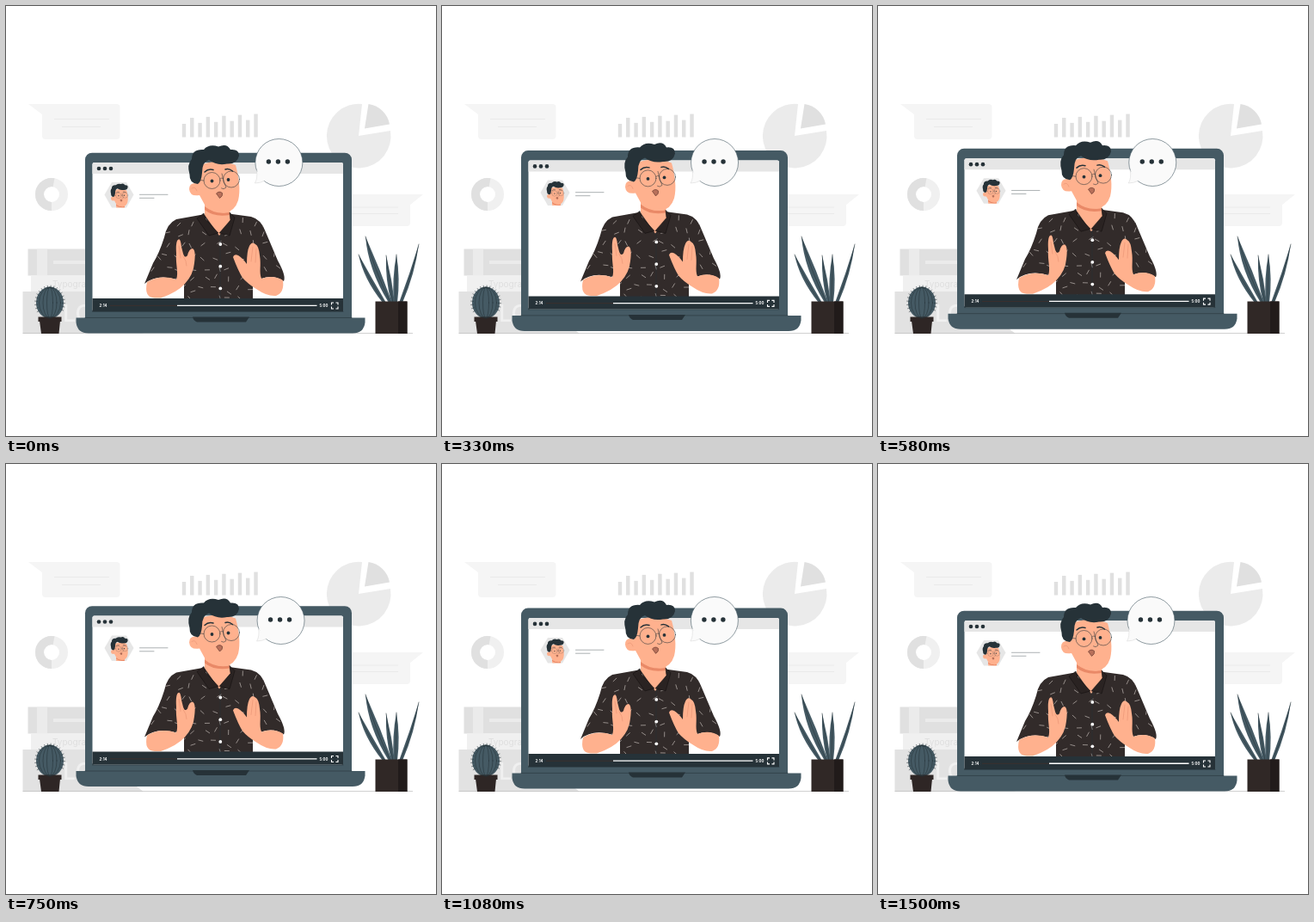
An HTML page that plays this animation: 500 px wide and 500 px high, repeating every 1540 ms.

```html
<!DOCTYPE html>
<html lang="en">
<head>
<meta charset="utf-8">
<title>Video call</title>
<style>
html, body { margin: 0; width: 100%; height: 100%; overflow: hidden; background: #fff; }
svg { display: block; width: 100vw; height: 100vh; }
text { font-family: Inter, sans-serif; }
.skin { fill: #ffb18e; }
.dark { fill: #263238; }
.steel { fill: #455a64; }
.pale { fill: #f5f5f5; }
.grey { fill: #e0e0e0; }
.mist { fill: #ebebeb; }
.line { fill: none; stroke: #263238; stroke-width: .55; stroke-linecap: round; }
.fold { fill: none; stroke: #e08a6c; stroke-width: .5; stroke-linecap: round; }
.ring { fill: none; stroke-width: 10; }
</style>
</head>
<body>
<svg viewBox="0 0 500 500">
  <defs>
    <path id="shirt" d="M226 243L198 248Q187 253 184 269Q178 288 171 299L161 323Q175 311 199 318L207 308V341H287V308L297 317Q311 312 323 320Q326 314 316 296L302 263Q297 248 285 245L263 242Z"/>
    <clipPath id="cloth"><use href="#shirt"/></clipPath>
    <path id="hexagon" d="M123 205H140L148.500 219.500L140 234.500H123L114.500 219.500Z"/>
    <clipPath id="frame"><use href="#hexagon"/></clipPath>
  </defs>

  <g id="wall">
    <path class="pale" d="M26 114H128.500Q132.500 114 132.500 118V151Q132.500 155 128.500 155H46Q42 155 42 151V126Z"/>
    <path class="pale" d="M485 219H395V256H466Q470 256 470 252V231Z"/>
    <path stroke="#e8e8e8" stroke-width=".8" d="M56 131.500H120M65 140.500H110M395 234H456M395 241.500H456"/>
    <g id="bars" class="grey"></g>
    <path class="mist" d="M410 151L414 114A37.300 37.300 0 1 0 447 145Z"/>
    <path class="grey" d="M417 142.500L421.500 114A29 29 0 0 1 446 137.500Z"/>
    <circle class="ring" cx="53" cy="219" r="14" stroke="#f0f0f0"/>
    <circle class="ring" cx="53" cy="219" r="14" stroke="#e0e0e0" pathLength="100" stroke-dasharray="53 47" transform="rotate(90 53 219)"/>
  </g>

  <g id="books">
    <path class="grey" d="M25.500 282.500H130V313.500H25.500Z"/>
    <path class="mist" d="M36 282.500H48V313.500H36ZM55 296H130V300H55Z"/>
    <path fill="#f0f0f0" d="M29 313.500H135V332H29Z"/>
    <text x="54" y="327" font-size="10" fill="#dedede">Typography</text>
    <path fill="#e2e2e2" d="M19.500 332H152V375L160 381H19.500Z"/>
    <text x="66" y="367" font-size="27" font-weight="500" fill="#f0f0f0">LOGO</text>
    <path stroke="#bdbdbd" stroke-width=".7" d="M19.500 380.500H473"/>
  </g>

  <g id="cactus">
    <ellipse class="steel" cx="51" cy="345" rx="16" ry="18.500"/>
    <path fill="#2e2625" d="M39 366H63L61.500 381H41ZM37.500 361.500H64.500V367H37.500Z"/>
  </g>

  <g id="plant"></g>
  <path fill="#302826" d="M429.500 343.500H466.500V381H429.500Z"/>
  <path fill="#211b1a" d="M456 343.500H466.500V381H456Z"/>

  <g id="laptop">
    <rect class="steel" x="92" y="170.700" width="310" height="200" rx="8"/>
    <rect x="100.500" y="182" width="291.500" height="173" rx="2" fill="#fff"/>
    <path fill="#e6e6e6" d="M100.500 195V184.500Q100.500 182 103 182H389.500Q392 182 392 184.500V195Z"/>
    <g id="window" class="dark"></g>

    <use href="#hexagon" fill="#e6e6e6"/>
    <g clip-path="url(#frame)"><use href="#head" transform="translate(49.500 151.500) scale(.34)"/></g>
    <path class="line" opacity=".7" d="M155.500 219.300H188M155.500 223.300H172"/>

    <use href="#shirt" fill="#322b2a"/>
    <g id="dashes" clip-path="url(#cloth)" stroke="#d8d0cc" stroke-width=".6" stroke-linecap="round"></g>
    <path class="line" d="M249 266V340"/>
    <g id="buttons" fill="#fff"></g>

    <g id="head">
      <path class="skin" d="M231 226L231 243L248 267L261 249L260 232Z"/>
      <path fill="#e98967" d="M231 233Q243 243 260 240L260 243Q242 246 231 237Z"/>
      <path class="skin" d="M226 185Q246 177 267 185C271 200 273 214 270 226Q266 239 254 240.500Q239 240 231 231L225 220Q214 222 213 213Q213 205 222 206Z"/>
      <path class="fold" d="M216 212Q220 209 222 215"/>
      <path class="dark" d="M223 207Q213 206 213.500 196Q210 184 216 178Q216 166 230 167Q236 160 247 163.500Q257 159 261 167Q271 166 271 174Q269 184 257 183.500Q245 186 236 179Q228 181 228 194Q227 205 223 207Z"/>
      <path class="line" style="stroke-width:1.500" d="M231 193Q235 189 241 190.500M255 190Q259 188.500 263.500 192"/>
      <path class="line" d="M249 201Q251 199 252.500 200.500M230 203L222 202M251 195Q253 205 256 211Q253 214 250.500 212"/>
      <circle class="line" cx="239.500" cy="203" r="9.500"/>
      <circle class="line" cx="262" cy="201.500" r="9.500"/>
      <circle class="dark" cx="239.500" cy="203.500" r="1.900"/>
      <circle class="dark" cx="258.500" cy="202" r="1.900"/>
      <path fill="#b8705a" stroke="#5a3229" stroke-width=".6" d="M244.500 218Q248 214.500 251.500 217.500Q252.500 221 248.500 223.500Z"/>
    </g>
    <path fill="#2a2322" stroke="#100d0d" stroke-width=".5" d="M230 241L222 247L236 267L247 264L232 248ZM260 240L266 246L260 267L248 264L261 249Z"/>

    <path class="skin" d="M164 321Q180 312 198 318C201 310 197 301 198 288Q197 273 200.500 271.500Q203 270 204 280L206 288Q208 294 211 290Q213 282 217 282Q221 284 219 299Q218 312 208 323Q199 333 180 339.500H173Q160 339 164 321Z"/>
    <path class="skin" d="M322 319Q311 312 297 317C294 309 297 302 295 290Q294 279 290 277Q286 273 283 279Q280 285 280 300Q275 293 270 290Q265 288 264 292Q270 308 275 316Q281 323 291 329Q304 338 314 337Q324 333 322 319Z"/>
    <path class="fold" d="M201 279L203 293M206 291Q210 296 210 302M287 280L285 297M291 282L290 298"/>

    <path class="dark" d="M100.500 340H392V355H100.500Z"/>
    <path stroke="#3b302d" d="M121 348.300H199"/>
    <path stroke="#fff" stroke-width="1.300" d="M199 348.300H361.500"/>
    <g fill="#fff" font-size="4.300" font-weight="700">
      <text x="108.500" y="350">2:14</text><text x="364.500" y="350">5:00</text>
    </g>
    <path fill="none" stroke="#fff" stroke-width="1.100" d="M378.500 347.500V345H381M383.500 345H386V347.500M386 349.500V352H383.500M381 352H378.500V349.500"/>
    <path class="steel" d="M81.500 362.500H417.500V368Q416 380.500 403 380.500H96Q83 380.500 81.500 368Z"/>
    <path class="line" d="M100.500 355.500H392M92 362.500H402"/>
    <path class="dark" d="M217 361.500H283L279 367.500H222Q218 366 217 361.500Z"/>
  </g>

  <g id="bubble">
    <circle cx="317.500" cy="182" r="27.500" fill="#fafafa" stroke="#455a64" stroke-width=".6"/>
    <path fill="#fafafa" stroke="#d5d5d5" stroke-width=".5" d="M291.500 191Q293 200 289.500 206Q296 206 301 203"/>
    <path fill="#fafafa" d="M292 190L302 203L308 190Z"/>
    <g id="typing" class="dark"></g>
  </g>
</svg>
<script>
const $ = id => document.getElementById(id);
const LOOP = 1540, LIFT = 5.5, TAU = Math.PI * 2;

function add(parent, tag, attrs) {
  const el = document.createElementNS('http://www.w3.org/2000/svg', tag);
  for (const k in attrs) el.setAttribute(k, attrs[k]);
  $(parent).append(el);
}

function dots(parent, x, y, dx, dy, r) {
  for (let i = 0; i < 3; i++) add(parent, 'circle', { cx: x + i * dx, cy: y + i * dy, r });
}

function dash(parent, x, y, angle, half, attrs) {
  const dx = Math.cos(angle) * half, dy = Math.sin(angle) * half;
  add(parent, 'line', { x1: x - dx, y1: y - dy, x2: x + dx, y2: y + dy, ...attrs });
}

function leaf(x, y, base, w) {
  const foot = 345, cx = x + (base - x) * .35, cy = (y + foot) / 2;
  add('plant', 'path', {
    d: `M${base - 2} ${foot}Q${cx - w} ${cy} ${x} ${y}Q${cx + w} ${cy} ${base + 2} ${foot}Z`, class: 'steel'
  });
  add('plant', 'path', { d: `M${base} ${foot}Q${cx} ${cy} ${x} ${y}`, class: 'line' });
}

let seed = 7;
function random() {
  seed = seed * 16807 % 2147483647;
  return seed / 2147483647;
}

dots('window', 108, 189, 7, 0, 2.3);
dots('buttons', 249.3, 277, 0, 25.7, 1.9);
dots('typing', 305.5, 181, 11, 0, 2.7);

// Bars alternate short and tall while growing to the right
for (let i = 0; i < 10; i++) {
  const height = (i % 2 ? 22 : 15.5) + i * .55;
  add('bars', 'rect', { x: 204.8 + i * 9.28, y: 152.5 - height, width: 4.4, height });
}

for (let rx = 3.5; rx < 16; rx += 4.5) add('cactus', 'ellipse', { cx: 51, cy: 345, rx, ry: 18, class: 'line' });
for (let a = .82 * Math.PI; a < 2.2 * Math.PI; a += .22)
  dash('cactus', 51 + Math.cos(a) * 16, 345 + Math.sin(a) * 18.5, a, 1.5, { class: 'line' });

leaf(480, 277, 459, 3);
leaf(410, 289, 440, 5);
leaf(454, 289, 453, 5);
leaf(418, 268, 447, 7);
leaf(442, 290, 450, 4);

// Jittered grid of short strokes, clipped to the shirt
for (let y = 248; y < 340; y += 13)
  for (let x = 170; x < 322; x += 14)
    dash('dashes', x + random() * 9, y + random() * 8, random() * Math.PI, 2.6);

function ease(p) {
  p = p ** .86;
  return p * p * (3 - 2 * p);
}

function draw(t) {
  const p = t / LOOP * 2;
  const rise = p < 1 ? ease(p) : 1 - ease(p - 1);
  const a = (t - 690) / LOOP * TAU;
  const sway = .25 + 1.1 * Math.cos(a) + .85 * Math.cos(2 * a);
  $('laptop').setAttribute('transform', `translate(0 ${-LIFT * rise})`);
  $('bubble').setAttribute('transform', `translate(${sway} 0)`);
}

const start = performance.now();
function tick() {
  draw((performance.now() - start) % LOOP);
  requestAnimationFrame(tick);
}
tick();
</script>
</body>
</html>
```
